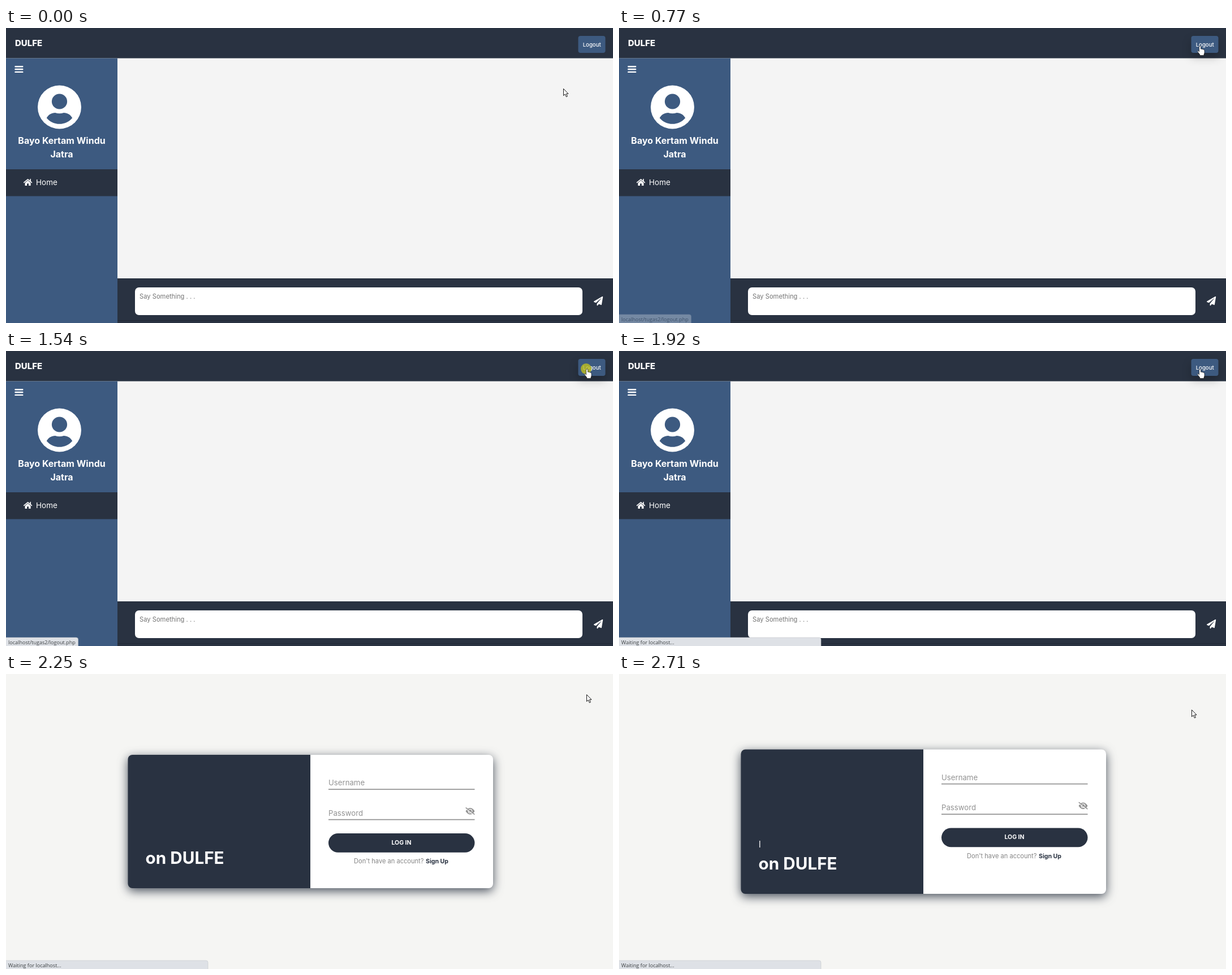
An HTML page for the animation above (2790 ms loop, 1073 by 522 pixels).

```html
<!DOCTYPE html>
<html lang="en">
<head>
<meta charset="utf-8">
<title>Logout</title>
<style>
  html, body { margin: 0; width: 100%; height: 100%; overflow: hidden; background: #f5f5f3; }
  svg { display: block; width: 1073px; height: 522px; font-family: Inter, sans-serif; }
  .dark { fill: #293241; }
  .blue { fill: #3d5a80; }
  .white { fill: #fff; }
  .grey { fill: #929292; }
  .bold { font-weight: 700; }
  .mid { text-anchor: middle; }
  .status { font: 9.05px "Open Sans", sans-serif; fill: #3c4043; }
  .bubble { fill: #dee1e6; stroke: #c3c7cc; stroke-width: .6; }

  /* All steps share one 2790 ms clock; percentages are ms / 27.9. */
  .run { animation: 2790ms step-end infinite; }
  #chat { animation-name: chat; }
  #login { animation-name: login; }
  #logout { animation-name: hover; }
  #link { animation-name: link; }
  #wait { animation-name: wait; }
  #click { animation-name: click; }
  #pointer { animation-name: move; }
  #arrow { animation-name: arrow; }
  #hand { animation-name: hand; }
  #card { y: 143px; height: 236px; filter: drop-shadow(0 5px 9px rgba(41, 50, 65, .85)); animation-name: grow; }
  #form { animation-name: rise; }
  #slogan { animation-name: sink; }
  #caret { animation-name: caret; }

  @keyframes chat { 0% { visibility: visible } 80.645% { visibility: hidden } }
  @keyframes login { 0% { visibility: hidden } 80.645% { visibility: visible } }
  @keyframes hover {
    0% { filter: none }
    21.146% { filter: drop-shadow(0 6px 6px rgba(0, 0, 0, .12)) }
    24.014% { filter: drop-shadow(0 8px 8px rgba(0, 0, 0, .22)) }
  }
  @keyframes link {
    0% { opacity: 0 }
    27.598% { opacity: .35 }
    30.107% { opacity: .75 }
    32.616% { opacity: 1 }
    68.817% { opacity: 0 }
  }
  @keyframes wait { 0% { opacity: 0 } 68.817% { opacity: 1 } }
  @keyframes click { 0% { opacity: 0 } 55.197% { opacity: 1 } 60.931% { opacity: 0 } }
  @keyframes move {
    0% { transform: translate(985px, 107px) }
    7.168% { transform: translate(988px, 103px) }
    10.035% { transform: translate(999px, 86px) }
    12.544% { transform: translate(1012px, 66px) }
    15.412% { transform: translate(1020px, 52px) }
    18.279% { transform: translate(1023px, 44px) }
    21.146% { transform: translate(1025px, 36px) }
    24.014% { transform: translate(1026px, 33px) }
    27.598% { transform: translate(1026px, 32px) }
    71.684% { transform: translate(1026px, 34px) }
    74.551% { transform: translate(1026px, 36px) }
    82.795% { transform: translate(1026px, 37px) }
    85.663% { transform: translate(1026px, 38px) }
    88.53% { transform: translate(1024px, 43px) }
    91.397% { transform: translate(1020px, 51px) }
    94.265% { transform: translate(1015px, 59px) }
    97.132% { transform: translate(1012px, 63px) }
  }
  @keyframes arrow { 0% { opacity: 1 } 21.146% { opacity: 0 } 74.551% { opacity: 1 } }
  @keyframes hand { 0% { opacity: 0 } 21.146% { opacity: 1 } 74.551% { opacity: 0 } }
  @keyframes grow { 0% { y: 143px; height: 236px } 94.265% { y: 133.5px; height: 255.5px } }
  @keyframes rise { 0% { transform: none } 94.265% { transform: translateY(-9.5px) } }
  @keyframes sink { 0% { transform: none } 94.265% { transform: translateY(10px) } }
  @keyframes caret { 0% { opacity: 0 } 94.265% { opacity: 1 } }
</style>
</head>
<body>
<svg viewBox="0 0 1073 522">
  <defs>
    <linearGradient id="halves">
      <stop offset=".5" stop-color="#293241"/>
      <stop offset=".5" stop-color="#fff"/>
    </linearGradient>
  </defs>

  <g id="chat" class="run">
    <rect width="1073" height="522" fill="#f4f4f4"/>
    <rect class="dark" width="1073" height="53.5"/>
    <text class="white" x="16" y="31.5" font-size="15" font-weight="800">DULFE</text>

    <g id="logout" class="run">
      <rect class="blue" x="1011.5" y="14" width="48" height="30" rx="4"/>
    </g>
    <text class="white mid" x="1035.7" y="32.5" font-size="9.6" font-weight="500">Logout</text>

    <!-- sidebar -->
    <rect class="blue" y="53.5" width="197" height="468.5"/>
    <path d="M16.5 68.3H29.3M16.5 73H29.3M16.5 77.9H29.3" stroke="#fff" stroke-width="2.4" stroke-linecap="round"/>
    <circle class="white" cx="94.5" cy="140" r="38.5"/>
    <circle class="blue" cx="94.5" cy="130" r="13.6"/>
    <path class="blue" d="M71.8 159.2C74.7 153.7 80.4 150 87 150Q94.5 152.4 102 150C108.6 150 114.3 153.7 117.2 159.2C111.7 165.7 103.6 169.8 94.5 169.8S77.3 165.7 71.8 159.2Z"/>
    <g class="white bold mid" font-size="16">
      <text x="98.5" y="205">Bayo Kertam Windu</text>
      <text x="98.5" y="228.5">Jatra</text>
    </g>
    <rect class="dark" y="250" width="197" height="47.5"/>
    <path d="M31.8 273.4L38.6 267.8L45.4 273.4M43.2 267.6V271" fill="none" stroke="#fff" stroke-width="1.6" stroke-linecap="round" stroke-linejoin="round"/>
    <path class="white" d="M33.6 273.9L38.6 269.8L43.6 273.9V279H40.1V275.3H37.1V279H33.6Z"/>
    <text class="white" x="53" y="278" font-size="13.5">Home</text>

    <!-- message bar -->
    <rect class="dark" x="197" y="443" width="876" height="79"/>
    <rect x="197" y="517" width="876" height="1" fill="#222a37"/>
    <rect class="white" x="228" y="459" width="791" height="49" rx="7"/>
    <text x="236" y="479" font-size="11.2" fill="#757575">Say Something . . .</text>
    <path class="white" transform="translate(1039 475) scale(.0316)" d="M476 3L12 271c-18 10-16 35 2 43L121 358L408 105c6-5 13 3 9 8L176 407v80c0 24 28 33 42 16L282 426L407 478c14 6 30-3 33-18L512 28C515 8 493-7 476 3z"/>

    <g id="link" class="run">
      <path class="bubble" d="M-1 507H124Q127.500 507 127.500 510.500V523H-1Z"/>
      <text class="status" x="4" y="519">localhost/tugas2/logout.php</text>
    </g>
  </g>

  <g id="login" class="run">
    <rect width="1073" height="522" fill="#f5f5f3"/>
    <rect id="card" class="run" x="215.500" width="645.500" rx="8" fill="url(#halves)"/>
    <rect id="caret" class="run white" x="248.200" y="295" width="1.300" height="12"/>
    <g id="slogan" class="run">
      <text class="white bold" x="246.500" y="336" font-size="29.700">on DULFE</text>
    </g>
    <g id="form" class="run">
      <g class="grey" font-size="13.200">
        <text x="570" y="197">Username</text>
        <text x="570" y="250.500">Password</text>
        <rect x="570" y="203.200" width="258.500" height="1.700"/>
        <rect x="570" y="256.800" width="258.500" height="1.700"/>
      </g>
      <path class="grey" d="M812.500 242.700Q816 237 820.500 237T828.500 242.700Q825 248.500 820.500 248.500T812.500 242.700Z"/>
      <circle cx="820.500" cy="242.700" r="3.300" fill="none" stroke="#fff" stroke-width="1.200"/>
      <path d="M812.400 237.600L827.400 249.300" stroke="#fff" stroke-width="1.500"/>
      <path d="M813.200 236.800L827.800 248.200" stroke="#929292" stroke-width="1.600" stroke-linecap="round"/>
      <rect class="dark" x="570" y="282" width="258.500" height="33.700" rx="16.850"/>
      <text class="white bold mid" x="699" y="301.500" font-size="10.500">LOG IN</text>
      <text x="615" y="335" font-size="11.100" fill="#858585">Don't have an account?</text>
      <text class="dark bold" x="742" y="335" font-size="10.600">Sign Up</text>
    </g>
  </g>

  <g id="wait" class="run">
    <path class="bubble" d="M-1 507H353.500Q357 507 357 510.500V523H-1Z"/>
    <text class="status" x="4" y="519">Waiting for localhost...</text>
  </g>

  <circle id="click" class="run" cx="1025.500" cy="31.500" r="9.500" fill="#bebe1e" fill-opacity=".8"/>
  <g id="pointer" class="run" fill="#fff" stroke="#000" stroke-linejoin="round">
    <path id="arrow" class="run" stroke-width=".9" d="M.5 .5V12.600L3.300 10L5.400 14.800L7.400 13.900L5.400 9.300H9Z"/>
    <path id="hand" class="run" stroke-width=".6" d="M-.5 10V1.500Q-.5 0 1 0T2.500 1.500V5.200Q4 4.400 5 5.600Q6.500 5 7.200 6.400Q9 6 9 8V11.500Q9 13 8 14.500V16.500H.8V15L-3 10.200Q-4 8.500 -2.600 8Q-1.500 8 -.5 10Z"/>
  </g>
</svg>
</body>
</html>
```
